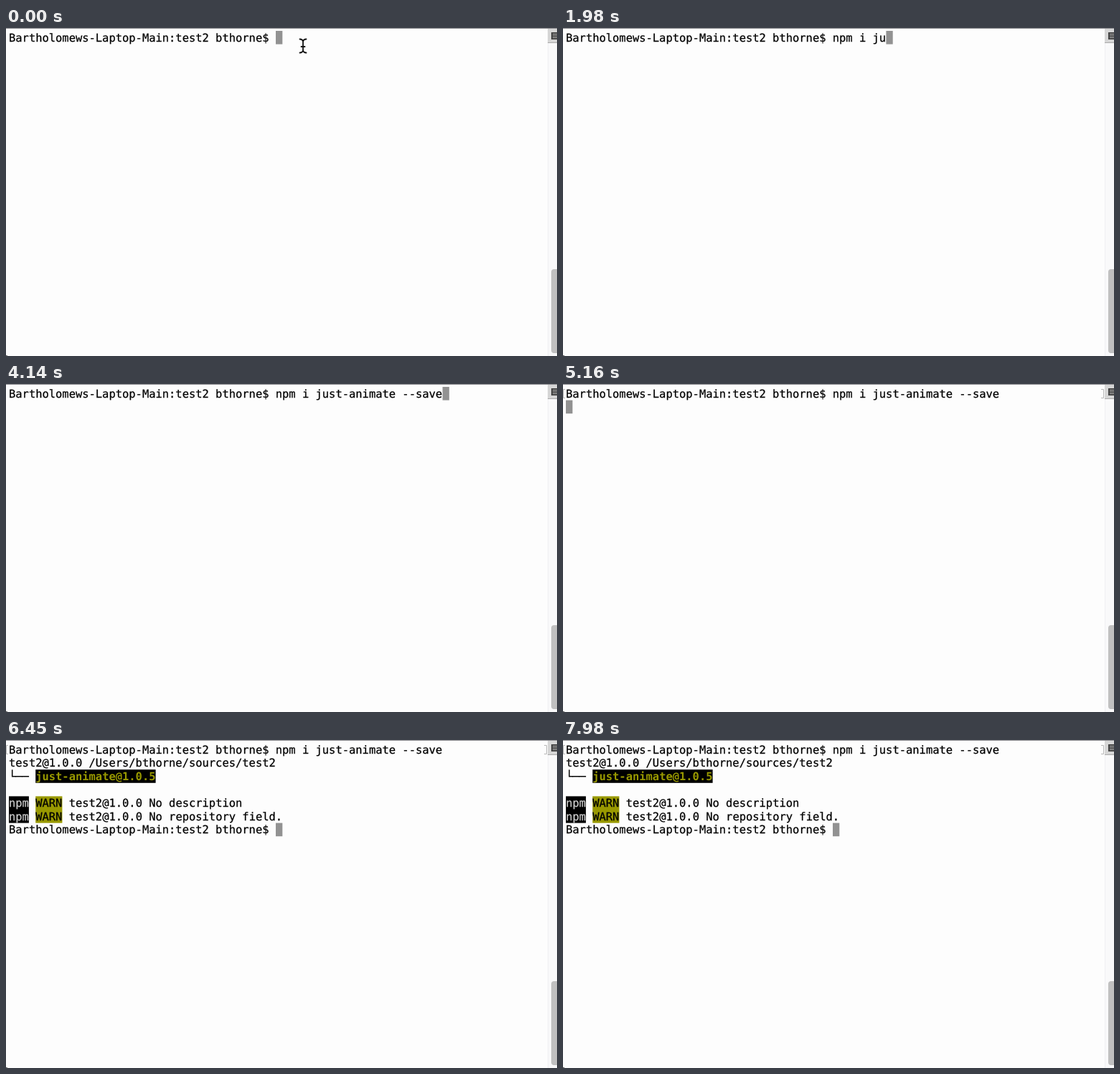
Animation of 768 by 457 pixels, one loop 8000 ms. Source, as an HTML page:

```html
<!DOCTYPE html>
<html lang="en">
<head>
<meta charset="utf-8">
<title>Terminal install</title>
<style>
  html, body { margin: 0; width: 100%; height: 100%; overflow: hidden; background: #fdfdfd; }
  svg { display: block; width: 100%; height: 100%; }
  text {
    font: 15.45px "DejaVu Sans Mono", "Liberation Mono", monospace;
    text-rendering: geometricPrecision;
    white-space: pre;
    stroke-width: 0.25px;
  }
  .bold { font-weight: bold; stroke: none; }
</style>
</head>
<body>
<svg viewBox="0 0 768 457" preserveAspectRatio="none">
  <rect width="768" height="457" fill="#fdfdfd"/>

  <!-- scroll bar -->
  <rect x="755" width="13" height="457" fill="#f9f9fa"/>
  <path d="M755.5 21V457" stroke="#f0f0f2"/>
  <rect x="760" y="336" width="16" height="117" rx="4" fill="#c0c0c0"/>
  <rect x="755" y="1" width="13" height="20" fill="#d6d6d6"/>
  <path d="M755 20.5H768" stroke="#aaa"/>
  <rect x="760" y="6" width="8" height="10" fill="#444"/>
  <path d="M762 8.5H768M762 11H768M762 13.5H768" stroke="#aaa"/>
  <rect width="768" height="1" fill="#88888c"/>
  <rect y="456" width="2" height="1" fill="#666"/>

  <rect id="cursor" width="9.3" height="18.6" fill="#929292"/>
  <g id="screen"></g>
  <g id="marks" fill="none" stroke="#b8b8b8">
    <path d="M3 7.5H0.5V19.5H3"/>
    <path d="M750 7.5H753.5V19.5H750"/>
  </g>
  <path id="beam" fill="none" stroke="#111" stroke-width="1.8" stroke-linecap="round"
    d="M409.5 15.5Q413 15.5 414 18.5Q415 15.5 418.5 15.5M414 18V32M409.5 34.5Q413 34.5 414 31.5Q415 34.5 418.5 34.5M411.5 26H416.5"/>
</svg>
<script>
const LOOP = 8000, LEFT = 4, TOP = 4, CELL = 9.3, ROW = 18.6;
const PROMPT = "Bartholomews-Laptop-Main:test2 bthorne$ ";
const COMMAND = "npm i just-animate --save";
const ENTER = 4400, OUTPUT = 5300, READY = 5700;
const OLIVE = "#999900";

// Key times: [ms, characters typed]
const KEYS = [[800, 0], [1980, 8], [2910, 15], [4080, 25]];

const $ = id => document.getElementById(id);
const make = (tag, attrs, parent) => {
  const el = document.createElementNS("http://www.w3.org/2000/svg", tag);
  for (const key in attrs) el.setAttribute(key, attrs[key]);
  return parent.appendChild(el);
};
const show = (el, on) => el.setAttribute("visibility", on ? "visible" : "hidden");

function write(parent, col, row, str, fill = "#000", back, bold) {
  const x = LEFT + col * CELL, y = TOP + row * ROW;
  if (back) make("rect", { x, y, width: str.length * CELL, height: ROW, fill: back }, parent);
  const el = make("text", { x, y: y + 14.5, fill, stroke: fill, class: bold ? "bold" : "" }, parent);
  el.textContent = str;
  return el;
}

const screen = $("screen");
const firstLine = write(screen, 0, 0, PROMPT);
const output = make("g", {}, screen);
write(output, 0, 1, "test2@1.0.0 /Users/bthorne/sources/test2");
write(output, 0, 2, "└──");
write(output, 4, 2, "just-animate@1.0.5", OLIVE, "#000", true);
["description", "repository field."].forEach((what, i) => {
  write(output, 0, 4 + i, "npm", "#ccc", "#000");
  write(output, 4, 4 + i, "WARN", "#000", OLIVE);
  write(output, 9, 4 + i, "test2@1.0.0 No " + what);
});
const nextPrompt = write(screen, 0, 6, PROMPT);

function typed(t) {
  for (let i = 1; i < KEYS.length; i++) {
    const [t0, n0] = KEYS[i - 1], [t1, n1] = KEYS[i];
    if (t < t1) return Math.max(0, Math.floor(n0 + (n1 - n0) * (t - t0) / (t1 - t0)));
  }
  return COMMAND.length;
}

function draw(t) {
  const count = typed(t);
  firstLine.textContent = PROMPT + COMMAND.slice(0, count);

  let col = PROMPT.length, row = 0;
  if (t < ENTER) col += count;
  else if (t < OUTPUT) [col, row] = [0, 1];
  else if (t < READY) [col, row] = [0, 6];
  else row = 6;
  $("cursor").setAttribute("x", LEFT + col * CELL);
  $("cursor").setAttribute("y", TOP + row * ROW);

  show($("beam"), count === 0);
  show($("marks"), t >= ENTER);
  show(output, t >= OUTPUT);
  show(nextPrompt, t >= READY);
}

const start = performance.now();
function tick() {
  draw((performance.now() - start) % LOOP);
  requestAnimationFrame(tick);
}
tick();
</script>
</body>
</html>
```
